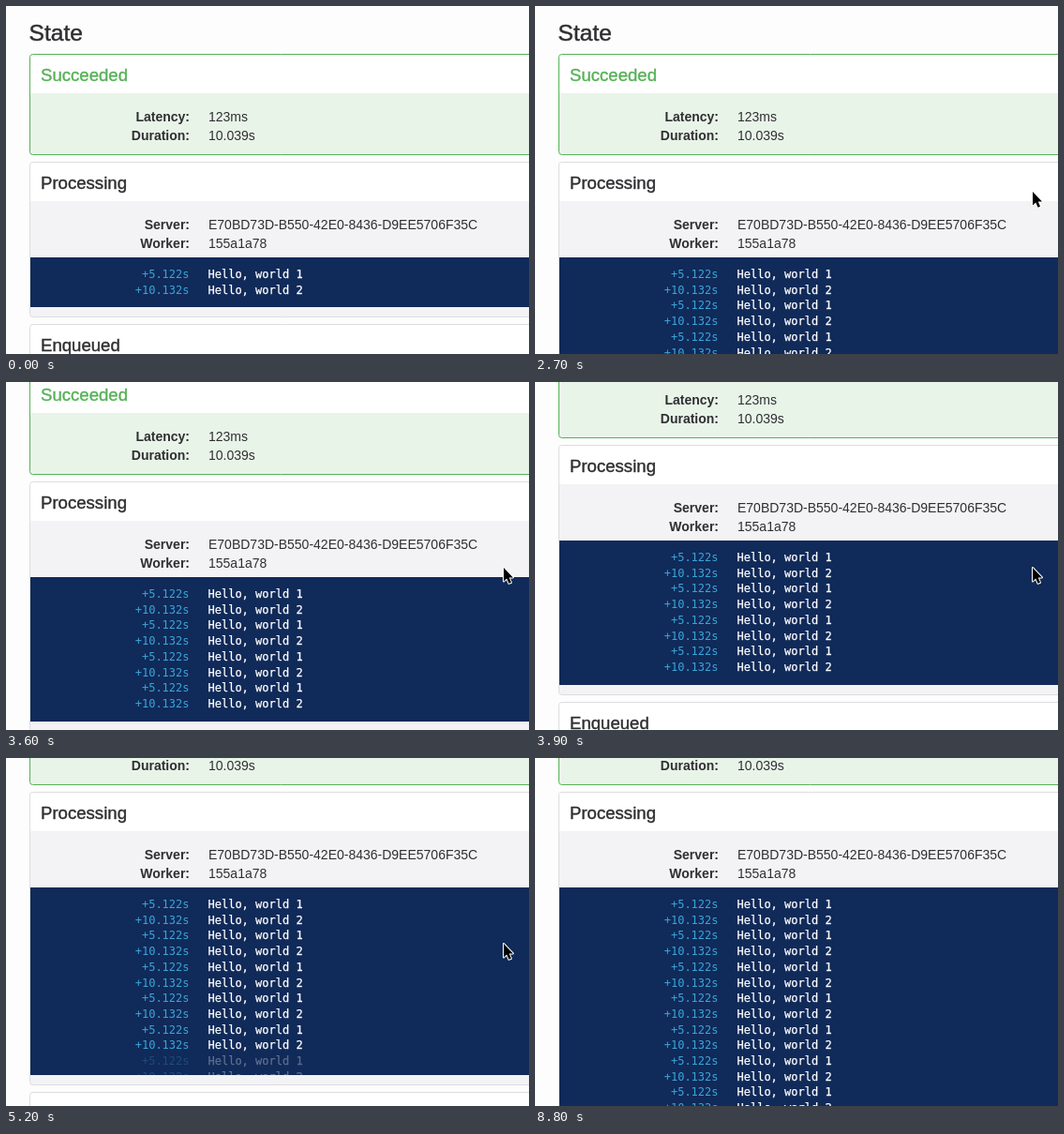
These frames come from a looping animation (558x371 px, 8900 ms). An HTML page with a canvas:

```html
<!DOCTYPE html>
<html lang="en">
<head>
<meta charset="utf-8">
<title>Job state</title>
<style>
  html, body { margin: 0; width: 100%; height: 100%; overflow: hidden; background: #fefdfe; }
  canvas { display: block; }
</style>
</head>
<body>
<canvas id="stage" width="558" height="371"></canvas>
<script>
const ctx = document.getElementById('stage').getContext('2d');
const WIDTH = 558, HEIGHT = 371, LOOP = 8900;
const SANS = '"Liberation Sans", Arial, sans-serif';
const MONO = '"DejaVu Sans Mono", monospace';
const INK = '#2f2f32', GREEN = '#57b158', GREY = '#dddcde';

const ROW = 16.7, CONSOLE_TOP = 268;
const MESSAGES = [['+5.122s', 'Hello, world 1'], ['+10.132s', 'Hello, world 2']];
const FIRST_BATCH = 790, BATCH_GAP = 1060, BATCHES = 6;
const SLIDE = 400, FADE = 480;
const SCROLL_START = 2890, SCROLL_TIME = 1500, SCROLL_BY = 130;
const CURSOR_IN = 2700, CURSOR_MOVE = 7200, CURSOR_OUT = 7300;

const swing = p => 0.5 - Math.cos(Math.PI * Math.min(1, Math.max(0, p))) / 2;
const batchStart = batch => FIRST_BATCH + (batch - 1) * BATCH_GAP;

function text(str, x, y, font, color, { align = 'left', weight = 0 } = {}) {
  ctx.font = font;
  ctx.textAlign = align;
  ctx.fillStyle = ctx.strokeStyle = color;
  ctx.fillText(str, x, y);
  if (weight) {
    ctx.lineWidth = weight;
    ctx.strokeText(str, x, y);
  }
}

function panel(title, top, height, border, fill, color = INK) {
  ctx.beginPath();
  ctx.roundRect(25.5, top + 0.5, WIDTH, height - 1, 3);
  ctx.fillStyle = '#fff';
  ctx.fill();
  ctx.fillStyle = fill;
  ctx.fillRect(26, top + 42, WIDTH, height - 43);
  ctx.strokeStyle = border;
  ctx.lineWidth = 1;
  ctx.stroke();
  text(title, 37, top + 29, `18.6px ${SANS}`, color, { weight: 0.4 });
}

function field(label, value, y) {
  text(label, 196, y, `bold 14px ${SANS}`, INK, { align: 'right' });
  text(value, 216, y, `14px ${SANS}`, INK);
}

function consoleHeight(t) {
  let rows = 2;
  for (let b = 1; b <= BATCHES; b++) rows += 2 * swing((t - batchStart(b)) / SLIDE);
  return Math.round(20 + rows * ROW);
}

function drawConsole(t, height) {
  ctx.save();
  ctx.beginPath();
  ctx.rect(26, CONSOLE_TOP, WIDTH, height);
  ctx.clip();
  ctx.fillStyle = '#102a59';
  ctx.fillRect(26, CONSOLE_TOP, WIDTH, height);
  for (let i = 0; i < 2 * (BATCHES + 1); i++) {
    const batch = i >> 1;
    ctx.globalAlpha = batch ? swing((t - batchStart(batch)) / FADE) : 1;
    const [time, message] = MESSAGES[i % 2];
    const y = Math.round(CONSOLE_TOP + 22 + i * ROW);
    text(time, 195.5, y, `12px ${MONO}`, '#3ba4d9', { align: 'right' });
    text(message, 215.5, y, `12px ${MONO}`, '#fff', { weight: 0.25 });
  }
  ctx.restore();
}

function drawCursor(x, y) {
  const outline = [[0, 0], [0, 14.5], [3.3, 11.5], [5.6, 16.8], [8, 15.8], [5.8, 10.6], [10, 10.4]];
  ctx.beginPath();
  for (const [dx, dy] of outline) ctx.lineTo(x + dx, y + dy);
  ctx.closePath();
  ctx.lineJoin = 'round';
  ctx.lineWidth = 2;
  ctx.strokeStyle = '#fff';
  ctx.stroke();
  ctx.fillStyle = '#000';
  ctx.fill();
}

function draw(t) {
  const scroll = Math.round(SCROLL_BY * swing((t - SCROLL_START) / SCROLL_TIME));
  const height = consoleHeight(t);
  const processingEnd = CONSOLE_TOP + height + 11;

  ctx.fillStyle = '#fefdfe';
  ctx.fillRect(0, 0, WIDTH, HEIGHT);

  ctx.save();
  ctx.translate(0, -scroll);
  text('State', 24.5, 37, `24.6px ${SANS}`, INK, { weight: 0.5 });

  panel('Succeeded', 51, 108, GREEN, '#e9f4e9', GREEN);
  field('Latency:', '123ms', 123);
  field('Duration:', '10.039s', 143);

  panel('Processing', 166, processingEnd - 166, GREY, '#f3f2f4');
  field('Server:', 'E70BD73D-B550-42E0-8436-D9EE5706F35C', 238);
  field('Worker:', '155a1a78', 258);
  drawConsole(t, height);

  panel('Enqueued', processingEnd + 7, 100, GREY, '#f3f2f4');
  ctx.restore();

  if (t >= CURSOR_IN && t < CURSOR_OUT) {
    const moved = t >= CURSOR_MOVE;
    drawCursor(moved ? 533 : 531, moved ? 194 : 198);
  }
}

const began = performance.now();
function tick() {
  draw((performance.now() - began) % LOOP);
  requestAnimationFrame(tick);
}
tick();
</script>
</body>
</html>
```
